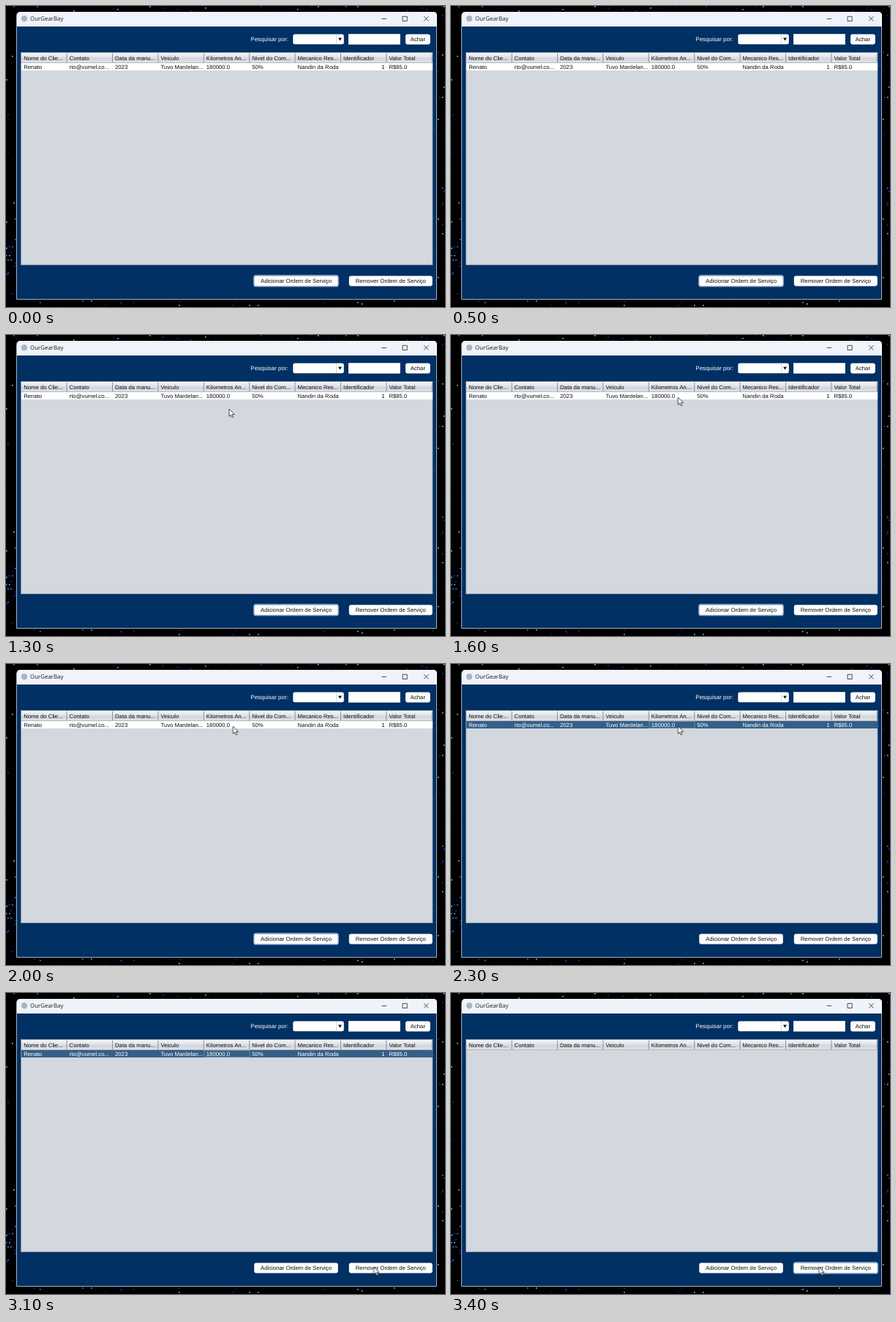
An HTML page that plays this animation: 600 by 411 pixels, repeating every 4800 ms.

```html
<!DOCTYPE html>
<html lang="pt-BR">
<head>
<meta charset="utf-8">
<title>OurGearBay</title>
<style>
  html, body { margin: 0; width: 100%; height: 100%; overflow: hidden; background: #000; }
  svg { display: block; width: 100vw; height: 100vh; }
  text { font: 7.75px "Liberation Sans", Arial, sans-serif; text-rendering: geometricPrecision; white-space: pre; }
  .title { font: 7.9px "Open Sans", "Noto Sans", sans-serif; fill: #1c1c1c; }
  .label { font-size: 8px; fill: #fff; }
  .ring { fill: none; stroke: #a3bfdd; stroke-width: 1.2; }

  #row, #selection, #addRing, #removeRing, #cursor { animation: 4800ms step-end infinite; }
  #row { animation-name: row; }
  #selection { animation-name: selection; }
  #addRing { animation-name: add-ring; }
  #removeRing { animation-name: remove-ring; }
  #cursor { animation-name: cursor; }

  @keyframes row {
    0% { fill: #111; opacity: 1; }
    45.82% { fill: #fff; opacity: 1; }
    68.74%, 100% { fill: #fff; opacity: 0; }
  }
  @keyframes selection {
    0% { opacity: 0; }
    45.82% { opacity: 1; }
    68.74%, 100% { opacity: 0; }
  }
  @keyframes add-ring {
    0% { opacity: 1; }
    45.82%, 100% { opacity: 0; }
  }
  @keyframes remove-ring {
    0% { opacity: 0; }
    66.66%, 100% { opacity: 1; }
  }
  /* The pointer is sampled every 100 ms, hence the steps. */
  @keyframes cursor {
    0% { transform: translate(232px, 420px); }
    10.41% { transform: translate(232px, 420px); animation-timing-function: steps(2); }
    14.57% { transform: translate(262px, 290px); animation-timing-function: steps(2); }
    18.74% { transform: translate(280.3px, 215px); animation-timing-function: steps(4); }
    27.07% { transform: translate(305px, 101px); animation-timing-function: steps(3); }
    33.32% { transform: translate(310.3px, 85px); }
    49.99% { transform: translate(310.3px, 85px); animation-timing-function: steps(2); }
    54.15% { transform: translate(428px, 262px); animation-timing-function: steps(2); }
    58.32%, 100% { transform: translate(502.8px, 374px); }
  }
</style>
</head>
<body>
<svg viewBox="0 0 600 411" preserveAspectRatio="none">
  <defs>
    <linearGradient id="headerFill" x2="0" y2="1">
      <stop offset="0" stop-color="#f4f5f7"/>
      <stop offset=".45" stop-color="#e0e3e8"/>
      <stop offset=".55" stop-color="#d2d6dd"/>
      <stop offset="1" stop-color="#dfe2e8"/>
    </linearGradient>
    <clipPath id="rowClip"><rect x="21" y="77.5" width="562" height="10.6"/></clipPath>
  </defs>

  <rect width="600" height="411" fill="#000"/>
  <g id="specks"></g>

  <path d="M14.5 400.5V13.5q0-5 5-5H583.5q5 0 5 5V400.5z" fill="#003064" stroke="#a9b0bb"/>
  <path d="M15 28V13q0-5 5-5H584q5 0 5 5V28z" fill="#f0f3f9"/>
  <circle cx="25" cy="17.3" r="4.2" fill="#a9b5c3"/>
  <text class="title" x="33" y="20.2">OurGearBay</text>
  <path d="M513.5 17.5h6.5M542 14.3h6.2v6.2h-6.2zM571.2 14.2l6.3 6.3m0-6.3l-6.3 6.3" fill="none" stroke="#222" stroke-width=".8"/>

  <text class="label" x="334.3" y="48">Pesquisar por:</text>
  <rect x="392.3" y="38.5" width="69.5" height="13.7" rx="2.5" fill="#fff"/>
  <path d="M451.5 39v12.7" stroke="#c4c9d2" stroke-width=".7"/>
  <path d="M454 43.4h5l-2.5 4z" fill="#111"/>
  <rect x="468" y="38.2" width="70.8" height="14.4" fill="#fff"/>

  <rect x="20.5" y="63.5" width="562.5" height="290" fill="#d3d7de" stroke="#8694a8" stroke-width=".8"/>
  <rect x="21" y="64" width="562" height="13.5" fill="url(#headerFill)"/>
  <path d="M21 77.5H583" stroke="#a2a9b5" stroke-width=".7"/>
  <g id="header" fill="#111"></g>

  <g id="row" clip-path="url(#rowClip)">
    <rect x="21" y="78" width="562" height="10" fill="#fff"/>
    <g id="selection">
      <rect x="21" y="78" width="562" height="10" fill="#345f87"/>
      <rect x="271" y="78.3" width="62" height="9.4" fill="none" stroke="#7d9fbe" stroke-width=".7"/>
    </g>
    <g id="cells"></g>
  </g>

  <g id="buttons" fill="#111"></g>
  <rect id="addRing" class="ring" x="338.8" y="367.9" width="115.4" height="15" rx="3"/>
  <rect id="removeRing" class="ring" x="468.3" y="367.9" width="115" height="15" rx="3"/>

  <g id="cursor">
    <path d="M0 0V10.2L2.4 8 4 11.8 5.7 11 4.1 7.4H7.2z" fill="#fff" stroke="#222" stroke-width=".8" stroke-linejoin="round"/>
  </g>
</svg>
<script>
  const byId = id => document.getElementById(id);

  function add(parent, tag, attrs, text = "") {
    const node = document.createElementNS("http://www.w3.org/2000/svg", tag);
    for (const key in attrs) node.setAttribute(key, attrs[key]);
    node.textContent = text;
    byId(parent).append(node);
  }

  const headings = ["Nome do Clie...", "Contato", "Data da manu...", "Veiculo", "Kilometros An...",
    "Nivel do Com...", "Mecanico Res...", "Identificador", "Valor Total"];
  const values = ["Renato", "rto@vumel.co...", "2023", "Tuvo Mardelan...", "180000.0",
    "50%", "Nandin da Roda", "1", "R$85.0"];
  const columnWidth = 62.4;

  headings.forEach((heading, i) => {
    const left = 21 + i * columnWidth;
    const numeric = i === 7;
    add("header", "text", { x: left + 3.2, y: 73.6 }, heading);
    add("header", "path", { d: `M${left + columnWidth - .3} 64.5V77`, stroke: "#747d8b", "stroke-width": .8 });
    add("cells", "text", {
      x: numeric ? left + 59.8 : left + 3.2, y: 86.1, "text-anchor": numeric ? "end" : "start"
    }, values[i]);
  });

  function button(x, y, width, label) {
    add("buttons", "rect", { x, y, width, height: 14, rx: 2.8, fill: "#fdfdfe" });
    add("buttons", "text", { x: x + width / 2, y: y + 9.8, "text-anchor": "middle" }, label);
  }
  button(546, 38.4, 33.8, "Achar");
  button(339.2, 368.4, 114.6, "Adicionar Ordem de Serviço");
  button(468.8, 368.4, 114, "Remover Ordem de Serviço");

  // Wallpaper: blue specks scattered around the window.
  let seed = 29;
  const random = () => (seed = seed * 16807 % 2147483647) / 2147483647;
  const blues = ["#00002c", "#000648", "#06187c", "#1238b8", "#3f8fe8", "#7cc8f4"];

  function scatter(x, y, width, height, count, brightness) {
    for (let i = 0; i < count; i++) {
      const shade = Math.floor(random() ** (1.8 - brightness) * blues.length);
      add("specks", "rect", {
        x: x + Math.floor(random() * width / 2) * 2,
        y: y + Math.floor(random() * height / 2) * 2,
        width: 1.6, height: 1.6, fill: blues[shade]
      });
    }
  }
  scatter(0, 0, 14, 300, 20, .5);
  scatter(0, 312, 14, 36, 20, 1.1);
  scatter(0, 350, 14, 60, 18, .3);
  scatter(0, 0, 600, 8, 55, 0);
  scatter(590, 0, 10, 411, 40, .4);
  scatter(0, 402, 600, 8, 50, 0);
</script>
</body>
</html>
```
